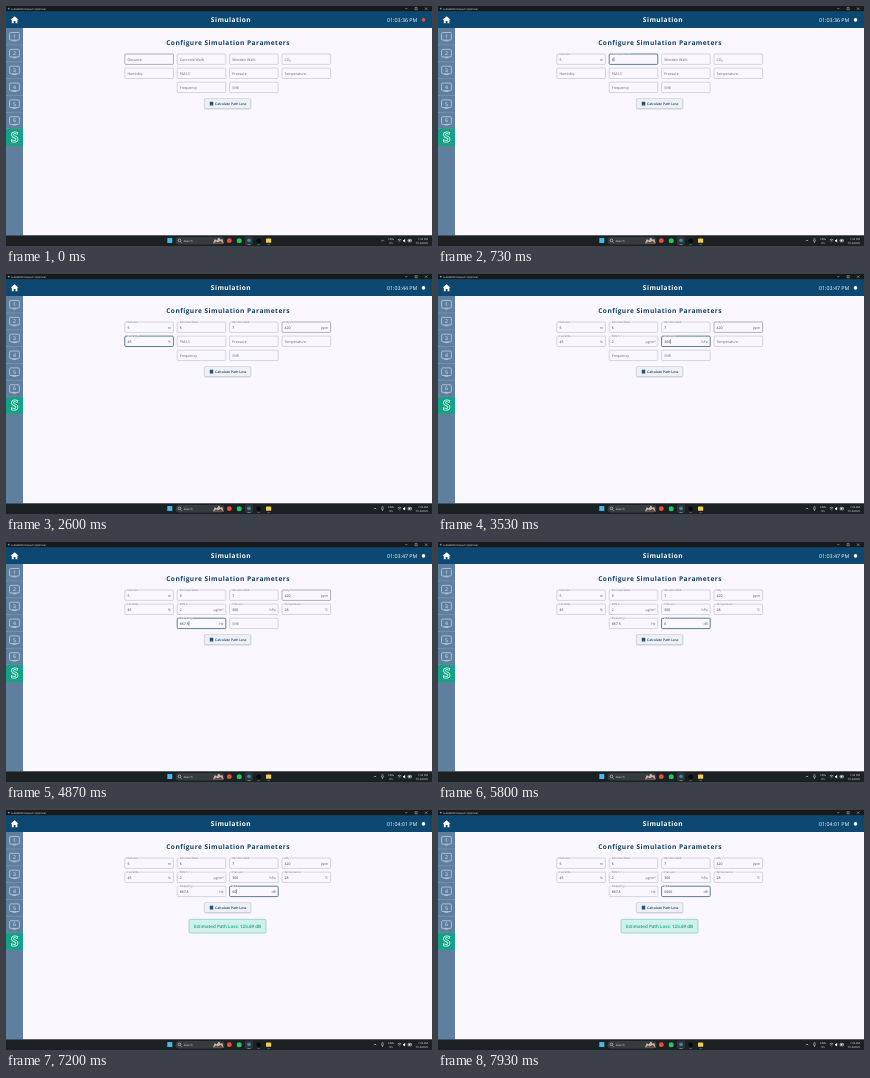
An HTML page for the animation above (8000 ms loop, 426x240 px).

```html
<!DOCTYPE html>
<html lang="en">
<head>
<meta charset="utf-8">
<title>Simulation</title>
<style>
  html, body { margin: 0; width: 100%; height: 100%; overflow: hidden; background: #faf7fe; }
  svg { display: block; width: 100vw; height: 100vh; font-family: "Open Sans", "Noto Sans", sans-serif; }
  text { text-rendering: geometricPrecision; }
  .mid { text-anchor: middle; }
  .end { text-anchor: end; }
  .heading { font-size: 6.6px; font-weight: 700; letter-spacing: .46px; }
  .box { fill: none; stroke: #b3b0b9; stroke-width: .5; }
  .hover .box { stroke: #6a6871; }
  .focus .box { stroke: #2a5871; stroke-width: .75; }
  .label { fill: #65626c; font-size: 3.55px; }
  .filled .label { font-size: 2.65px; stroke: #faf7fe; stroke-width: .7; paint-order: stroke; }
  .focus .label { fill: #174a68; }
  .value { fill: #3d3b44; font-size: 3.5px; }
  .unit { fill: #66636d; font-size: 3.5px; visibility: hidden; }
  .filled .unit { visibility: visible; }
  .caret { stroke: #222; stroke-width: .45; }
  .line { fill: none; stroke: #e8eef4; stroke-width: .55; }
  .thin { stroke-width: .4; }
  .tray { fill: #f4f5f6; font-size: 2.65px; }
  #light { animation: light 8s step-end infinite; }
  @keyframes light { 0% { fill: #e5533d; } 4.2% { fill: #fff; } }
</style>
</head>
<body>
<svg viewBox="0 0 426 240" preserveAspectRatio="none">
  <rect width="426" height="240" fill="#faf7fe"/>
  <rect y="5" width="426" height="17" fill="#0d4872"/>
  <rect width="426" height="5.2" fill="#17191b"/>
  <circle cx="2.7" cy="2.6" r=".9" fill="#58a6c8"/>
  <text x="5" y="3.6" font-size="2.58" fill="#e6e6e6">LoRaWAN Network Optimizer</text>
  <path class="line thin" d="M399 2.7h2.4M409 1.6h2.2v2.2h-2.2zM419 1.5l2.3 2.3m0-2.3l-2.3 2.3"/>
  <path fill="#fff" d="M8.6 10.2l3.9 3.6h-1.1v3.5H9.5v-2.4H7.7v2.4H5.8v-3.5H4.7z"/>
  <text class="heading mid" x="225" y="16.3" fill="#fff">Simulation</text>
  <text class="end" id="clock" x="411.3" y="15.9" font-size="5.3" fill="#fff"></text>
  <circle id="light" cx="417.5" cy="13.9" r="1.8" fill="#fff"/>

  <rect y="22" width="17" height="207.5" fill="#5f7f9f"/>
  <g id="nav"></g>
  <rect y="123" width="17" height="16.8" fill="#13a283"/>
  <text class="mid" x="8.5" y="136.2" font-size="14" font-weight="700" fill="none" stroke="#eafff8" stroke-width=".8">S</text>

  <text class="heading mid" x="222.1" y="39" fill="#123f66">Configure Simulation Parameters</text>
  <g id="fields"></g>

  <rect x="198.2" y="93.2" width="47" height="10.2" rx="1.4" fill="#d8d6de"/>
  <rect x="198.2" y="92.6" width="46.6" height="10" rx="1.3" fill="#eef0f6" stroke="#b4bcc9" stroke-width=".5"/>
  <rect x="203.8" y="95.7" width="3.4" height="3.8" rx=".4" fill="#143f64"/>
  <path d="M204.4 96.7h2.2M204.4 98.3h2.2" stroke="#b9c9d8" stroke-width=".3"/>
  <text x="209" y="99" font-size="3.38" font-weight="600" fill="#143f64">Calculate Path Loss</text>

  <g id="result">
    <rect x="183" y="109.3" width="77" height="13.8" rx="1.5" fill="#d2f1ea" stroke="#68c8b3" stroke-width=".6"/>
    <text class="mid" x="221.5" y="118" font-size="4.5" font-weight="600" fill="#11a080">Estimated Path Loss: 125.69 dB</text>
  </g>

  <rect y="229.3" width="426" height="10.7" fill="#1b2122"/>
  <rect x="161.3" y="232" width="5" height="5" fill="#42b9ea"/>
  <rect x="169.5" y="231" width="49" height="7.6" rx="3.8" fill="#353c3e"/>
  <path class="line" d="M174.6 235.6l1 1"/><circle class="line" cx="173.5" cy="234.4" r="1.3"/>
  <text x="177.7" y="235.8" font-size="2.85" fill="#d7dcde">Search</text>
  <path fill="#c3b6b0" d="M207 237.5l1.6-4.5 2 1.5 2.2-3 2 2.3 1.5-.8 1.3 4.5z"/>
  <path fill="#5d433c" d="M207 237.7l3-2.2 2 1 2.4-1.8 3.2 3z"/>
  <circle cx="223.3" cy="234.7" r="2.4" fill="#ed4f32"/>
  <circle cx="233.2" cy="234.7" r="2.5" fill="#20c762"/>
  <rect x="239" y="230.4" width="8" height="8.4" rx="1" fill="#2c3437"/>
  <circle cx="243" cy="234.3" r="1.9" fill="#417d9f"/>
  <path d="M241.5 238.6h3" stroke="#69c4ee" stroke-width=".6"/>
  <circle cx="252.7" cy="234.7" r="2.3" fill="#08090a"/>
  <rect x="260" y="232.4" width="5.2" height="4.4" rx=".5" fill="#f3cb58"/>
  <path d="M251.5 238.6h2.4M261.4 238.6h2.4" stroke="#91999c" stroke-width=".5"/>

  <path class="line" id="chevron" d="M-1.2 235.2l1.2-1.2 1.2 1.2"/>
  <g id="mic"><rect class="line thin" x="375.8" y="232.4" width="1.4" height="2.9" rx=".7"/><path class="line thin" d="M375 234.6q1.5 2.8 3 0M376.5 236v1"/></g>
  <text class="tray mid" x="385" y="233.9">ENG</text>
  <text class="tray mid" x="385" y="237.7">US</text>
  <path class="line" d="M391.7 233.9q1.8-1.6 3.6 0M392.5 235q1-1 2 0M393.3 236h.5"/>
  <path fill="#eee" d="M397 234h.9l1.3-1.2v3.8l-1.3-1.2H397z"/>
  <rect class="line" x="402" y="233.4" width="3.5" height="2.4" rx=".4"/><path d="M402.5 234.6h2" stroke="#eee" stroke-width="1.4"/>
  <text class="tray end" id="trayTime" x="422" y="233.9"></text>
  <text class="tray end" x="422" y="237.7">7/14/2025</text>
</svg>
<script>
const LOOP = 8000;
const BLINK = 330;
const $ = id => document.getElementById(id);

// focus: [start, end] pairs; keys: the moment each character lands
const fields = [
  { label: "Distance", unit: "m", text: "5", col: 0, row: 0, focus: [[130, 470]], keys: [330], hover: [0, 130] },
  { label: "Concrete Walls", unit: "", text: "6", col: 1, row: 0, focus: [[470, 870]], keys: [730] },
  { label: "Wooden Walls", unit: "", text: "7", col: 2, row: 0, focus: [[870, 1270]], keys: [1130] },
  { label: "CO₂", unit: "ppm", text: "420", col: 3, row: 0, focus: [[1270, 1930]], keys: [1530, 1600, 1730], hover: [1930, 5600] },
  { label: "Humidity", unit: "%", text: "45", col: 0, row: 1, focus: [[1930, 2730]], keys: [2200, 2330] },
  { label: "PM2.5", unit: "µg/m³", text: "2", col: 1, row: 1, focus: [[2730, 3070]], keys: [2930] },
  { label: "Pressure", unit: "hPa", text: "300", col: 2, row: 1, focus: [[3070, 3670]], keys: [3270, 3400, 3470] },
  { label: "Temperature", unit: "°C", text: "28", col: 3, row: 1, focus: [[3670, 4200]], keys: [3870, 4000] },
  { label: "Frequency", unit: "Hz", text: "867.5", col: 1, row: 2, focus: [[4200, 5000]], keys: [4400, 4470, 4600, 4730, 4800] },
  { label: "SNR", unit: "dB", text: "6000", col: 2, row: 2, focus: [[5000, 5870], [6800, LOOP]], keys: [5270, 7130, 7270, 7400] }
];
const clockSteps = [[0, "01:03:36"], [2070, "01:03:44"], [2870, "01:03:47"], [6000, "01:04:01"]];

function add(parent, tag, attrs, text = "") {
  const el = document.createElementNS("http://www.w3.org/2000/svg", tag);
  for (const key in attrs) el.setAttribute(key, attrs[key]);
  el.textContent = text;
  return parent.appendChild(el);
}

for (let i = 0; i < 6; i++) {
  const y = 30.5 + i * 16.85;
  add($("nav"), "rect", { class: "line", x: 3.6, y: y - 4, width: 9.8, height: 7.6, rx: 1 });
  add($("nav"), "path", { class: "line", d: `M6.5 ${y + 4.4}h4` });
  add($("nav"), "text", { class: "mid", x: 8.5, y: y + 1.7, "font-size": 5, fill: "#f2f6fa" }, i + 1);
  add($("nav"), "path", { d: `M0 ${y + 8.4}h17`, stroke: "#86a0b9", "stroke-width": .5 });
}

for (const f of fields) {
  f.x = 118.8 + f.col * 52.4;
  f.y = 48 + f.row * 14.1;
  f.group = add($("fields"), "g", {});
  add(f.group, "rect", { class: "box", x: f.x, y: f.y, width: 48.6, height: 10.4, rx: 1 });
  f.labelEl = add(f.group, "text", { class: "label", x: f.x + 2.6 }, f.label);
  f.valueEl = add(f.group, "text", { class: "value", x: f.x + 2.6, y: f.y + 6.6 });
  add(f.group, "text", { class: "unit end", x: f.x + 46.2, y: f.y + 6.6 }, f.unit);
  f.caret = add(f.group, "path", { class: "caret" });
}

const within = (t, [from, to]) => t >= from && t < to;

function drawField(f, t) {
  const typed = f.keys.filter(k => k <= t);
  const value = f.text.slice(0, typed.length);
  const span = f.focus.find(s => within(t, s));
  const filled = span || value !== "";
  f.group.setAttribute("class", [
    span && "focus", filled && "filled", f.hover && within(t, f.hover) && "hover"
  ].filter(Boolean).join(" "));
  f.labelEl.setAttribute("y", f.y + (filled ? .8 : 6.5));
  f.valueEl.textContent = value;

  // each key press restarts the caret's blink
  const caretOn = span && (t - Math.max(span[0], ...typed)) % BLINK < BLINK / 2;
  const caretX = f.x + 2.8 + (value ? f.valueEl.getComputedTextLength() : 0);
  f.caret.setAttribute("d", `M${caretX} ${f.y + 3}v4.6`);
  f.caret.style.visibility = caretOn ? "visible" : "hidden";
}

function draw(now) {
  const t = now % LOOP;
  for (const f of fields) drawField(f, t);
  const time = clockSteps.filter(([at]) => at <= t).pop()[1];
  $("clock").textContent = time + " PM";
  $("trayTime").textContent = time.slice(1, 5) + " PM";
  $("result").style.visibility = t >= 6000 ? "visible" : "hidden";
  const micOn = t >= 330;
  $("mic").style.visibility = micOn ? "visible" : "hidden";
  $("chevron").setAttribute("transform", `translate(${micOn ? 369 : 376.5})`);
}

const start = performance.now();
function tick() {
  draw(performance.now() - start);
  requestAnimationFrame(tick);
}
tick();
</script>
</body>
</html>
```
